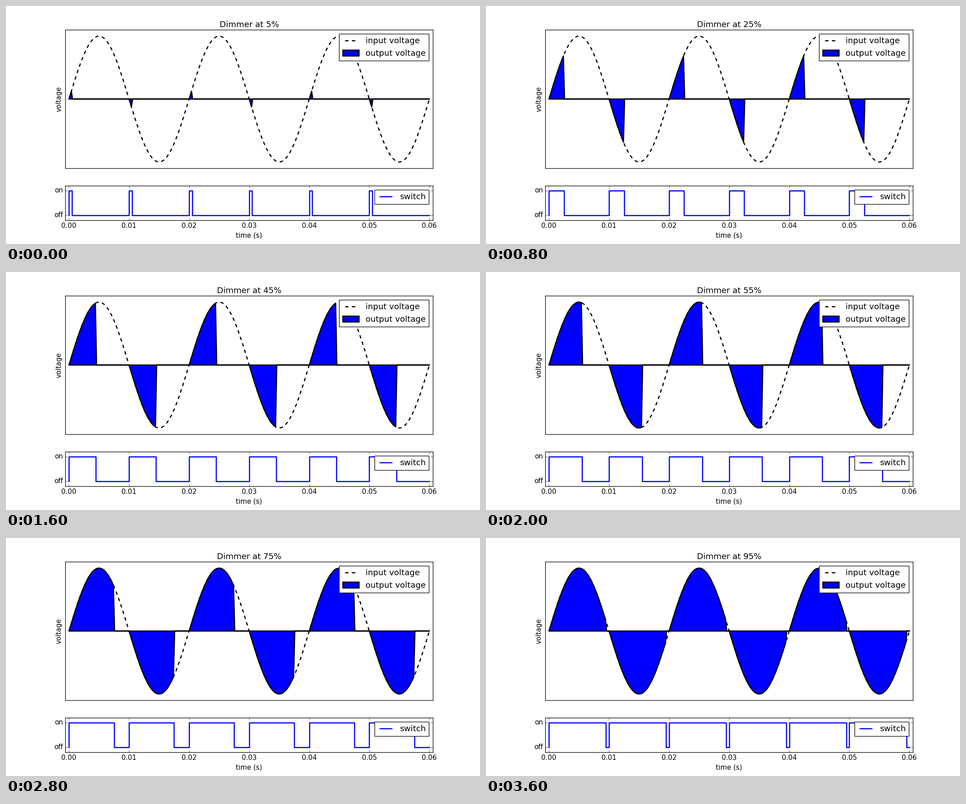
Recreate the animation shown at these times as a matplotlib script. Size 1056 px wide and 531 px high, loop 3.8 s.

```python
import numpy as np
import matplotlib.pyplot as plt
from matplotlib.animation import FuncAnimation

WIDTH, HEIGHT, DPI = 1056, 531, 91
FRAMES, INTERVAL = 19, 200
HALF = 0.01   # half a mains period, in seconds
END = 0.06

plt.style.use("classic")
plt.rcParams.update({
    "font.family": "DejaVu Sans",
    "figure.facecolor": "white",
    "savefig.facecolor": "white",
    "savefig.dpi": "figure",
})

t = np.linspace(0, END, 301)
voltage = np.sin(np.pi * t / HALF)


def output_points(duty):
    """Chopped sine: conducts for the first part of each half period."""
    on = t % HALF < duty * HALF
    return np.column_stack([t, np.where(on, voltage, 0)])


def switch_points(duty):
    """Square wave with exactly vertical edges."""
    starts = np.arange(6) * HALF
    stops = starts + duty * HALF
    x = np.column_stack([starts, starts, stops, stops]).ravel()
    y = np.tile([0, 1, 1, 0], len(starts))
    return np.append(x, END), np.append(y, 0)


fig, (top, bottom) = plt.subplots(
    2, 1, figsize=(WIDTH / DPI, HEIGHT / DPI), dpi=DPI,
    gridspec_kw=dict(height_ratios=[4, 1], left=0.1252, right=0.9008,
                     bottom=0.1, top=0.9, hspace=0.2))

top.plot(t, voltage, "k--", lw=2, label="input voltage")
output, = top.fill(*output_points(0.05).T, facecolor="b", edgecolor="k",
                   lw=2, joinstyle="round", label="output voltage")
top.set(xlim=(-0.0006, 0.0606), ylim=(-1.1, 1.1), xticks=[], yticks=[],
        ylabel="voltage")
title = top.set_title("")
top.legend(loc="upper right")

switch, = bottom.plot(*switch_points(0.05), "b-", lw=2, label="switch")
bottom.set(xlim=(-0.0006, 0.0606), ylim=(-0.2, 1.2), xlabel="time (s)")
bottom.set_xticks(np.arange(7) * HALF, [f"0.0{k}" for k in range(7)])
bottom.set_yticks([0, 1], ["off", "on"])
bottom.legend(loc="upper right", handletextpad=0.68)


def update(frame):
    percent = 5 * (frame + 1)
    duty = percent / 100
    title.set_text(f"Dimmer at {percent}%")
    output.set_xy(output_points(duty))
    switch.set_data(*switch_points(duty))
    return title, output, switch


anim = FuncAnimation(fig, update, frames=FRAMES, interval=INTERVAL,
                     repeat=True, repeat_delay=0, blit=False)
plt.show()
```
